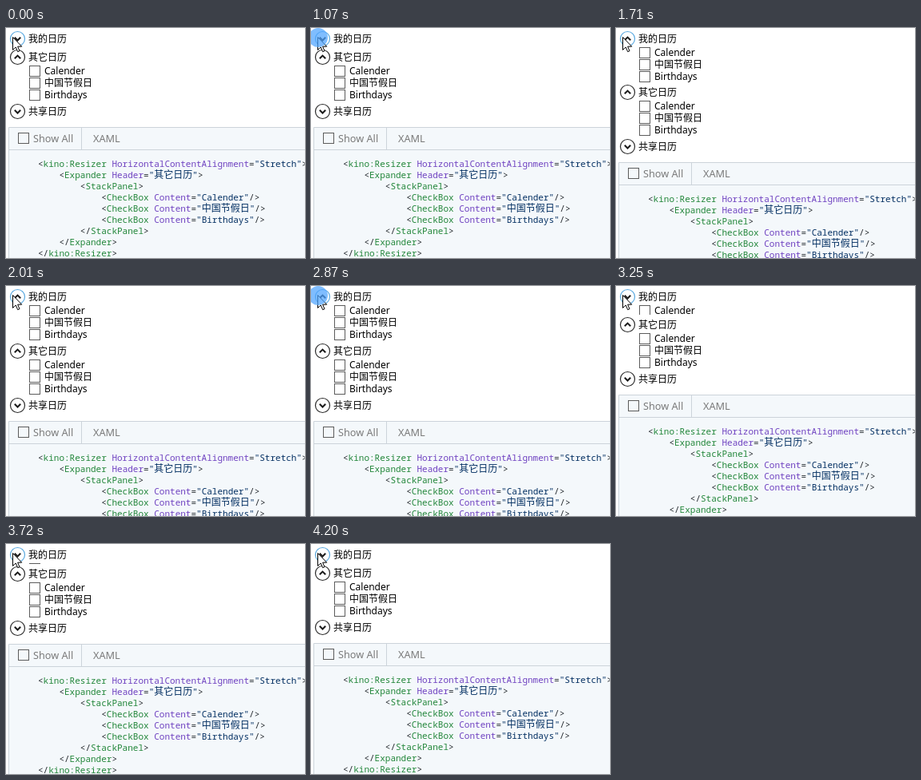
Recreate the animation shown at these times as an HTML page. Size 374x288 px, loop 4660 ms.

```html
<!DOCTYPE html>
<html lang="zh-CN">
<head>
<meta charset="utf-8">
<style>
  html, body { margin: 0; width: 100%; height: 100%; overflow: hidden; background: #fff; }
  svg { display: block; width: 374px; height: 288px; }
  text { white-space: pre; }
  .ui { font: 12px "Noto Sans", "Noto Sans CJK SC", "Noto Sans CJK", sans-serif; fill: #000; }
  .tab { font: 12.7px "Noto Sans", sans-serif; fill: #7a7a7a; }
  .code { font: 11px "Noto Sans Mono", "Noto Sans CJK SC", "Noto Sans CJK", monospace; fill: #24292e; }
  .cjk { font-size: 12px; }
  .tag { fill: #22863a; }
  .attr { fill: #6f42c1; }
  .str { fill: #032f62; }
  .line { fill: none; stroke: #ccd3da; }
  .box { fill: none; stroke: #5c5c5c; }
  .ring { fill: #fff; stroke: #2b2b2b; stroke-width: 1.2; }
  .hover { stroke: #5aa9e0; }
  .chevron { fill: none; stroke: #1a1a1a; stroke-width: 2; }
</style>
</head>
<body>
<svg id="stage" viewBox="0 0 374 288"></svg>
<script>
const LOOP = 4660;
const ROW = 15;
const ITEMS = ["Calender", "中国节假日", "Birthdays"];
const CODE = [
  '<kino:Resizer HorizontalContentAlignment="Stretch">',
  '    <Expander Header="其它日历">',
  '        <StackPanel>',
  ...ITEMS.map(name => `            <CheckBox Content="${name}"/>`),
  '        </StackPanel>',
  '    </Expander>',
  '</kino:Resizer>'
];

// [start ms, value], each held until the next
const HEIGHT = [[0, 0], [1240, 33], [1310, 44], [1860, 45],
                [3250, 12], [3340, 2], [3420, 1], [3960, 0]];
const PRESS = [[0, 0], [1070, 1], [1160, 0], [2870, 1], [2950, 0]];
const OPEN = [[0, 0], [1240, 1], [3250, 0]];

const stage = document.getElementById("stage");

function add(parent, tag, attrs = {}, text) {
  const el = document.createElementNS("http://www.w3.org/2000/svg", tag);
  for (const key in attrs) el.setAttribute(key, attrs[key]);
  if (text !== undefined) el.textContent = text;
  parent.appendChild(el);
  return el;
}

const chevron = up => up ? "M10.8 15.3L14.5 11.6L18.2 15.3" : "M10.8 11.8L14.5 15.5L18.2 11.8";

function header(parent, y, title, up, hover) {
  const g = add(parent, "g", { transform: `translate(0 ${y})` });
  add(g, "circle", { class: hover ? "ring hover" : "ring", cx: 14.5, cy: 13.5, r: 9 });
  const arrow = add(g, "path", { class: "chevron", d: chevron(up) });
  add(g, "text", { class: "ui", x: 28, y: 18 }, title);
  return arrow;
}

function checkBox(parent, x, y) {
  add(parent, "rect", { class: "box", x: x + .5, y: y + .5, width: 13, height: 13 });
}

function list(parent, y) {
  ITEMS.forEach((name, i) => {
    checkBox(parent, 29, y + i * ROW);
    add(parent, "text", { class: "ui", x: 48, y: y + 11 + i * ROW }, name);
  });
}

function codeLine(parent, y, source) {
  const line = add(parent, "text", { class: "code", x: 40, y });
  let quoted = false, afterBracket = false;
  for (const token of source.match(/<\/?|\/?>|"|=|[\u4e00-\u9fff]+|[\w:]+|\s+/g)) {
    let kind = "";
    if (token === '"') {
      quoted = !quoted;
      kind = "str";
    } else if (quoted) {
      kind = /[\u4e00-\u9fff]/.test(token) ? "str cjk" : "str";
    } else if (/\w/.test(token)) {
      kind = afterBracket ? "tag" : "attr";
    }
    afterBracket = token[0] === "<";
    add(line, "tspan", { class: kind }, token);
  }
}

// first expander, revealed by a growing clip
const clip = add(add(add(stage, "defs"), "clipPath", { id: "reveal" }),
  "rect", { x: 0, y: 23, width: 374, height: 0 });
list(add(stage, "g", { "clip-path": "url(#reveal)" }), 24);
const arrow = header(stage, 0, "我的日历", false, true);

// everything pushed down by it
const below = add(stage, "g");
header(below, 23, "其它日历", true);
list(below, 47);
header(below, 91, "共享日历", false);

add(below, "rect", { x: 3, y: 124, width: 380, height: 180, fill: "#f4f8fb" });
add(below, "path", { class: "line", d: "M374 124.5H3.5V300M4 152.5H374M94.5 125V152" });
checkBox(below, 15, 131);
add(below, "text", { class: "tab", x: 34, y: 143 }, "Show All");
add(below, "text", { class: "tab", x: 109, y: 143 }, "XAML");
CODE.forEach((source, i) => codeLine(below, 174 + i * 14, source));

add(stage, "path", {
  d: "M8.5 11.5V27.5L12.2 24L14.7 29.7L17 28.7L14.6 23.2H19.7Z",
  fill: "#fff", stroke: "#000", "stroke-width": 1
});
const press = add(stage, "circle", { cx: 9, cy: 12, r: 12, fill: "#4da3ff", "fill-opacity": .72 });

const valueAt = (steps, t) => steps.findLast(step => step[0] <= t)[1];

function draw(now) {
  const t = Math.max(0, now) % LOOP;
  const height = valueAt(HEIGHT, t);
  clip.setAttribute("height", height + 1);
  below.setAttribute("transform", `translate(0 ${height})`);
  arrow.setAttribute("d", chevron(valueAt(OPEN, t)));
  press.setAttribute("visibility", valueAt(PRESS, t) ? "visible" : "hidden");
}

const start = performance.now();
function tick() {
  draw(performance.now() - start);
  requestAnimationFrame(tick);
}
tick();
</script>
</body>
</html>
```
